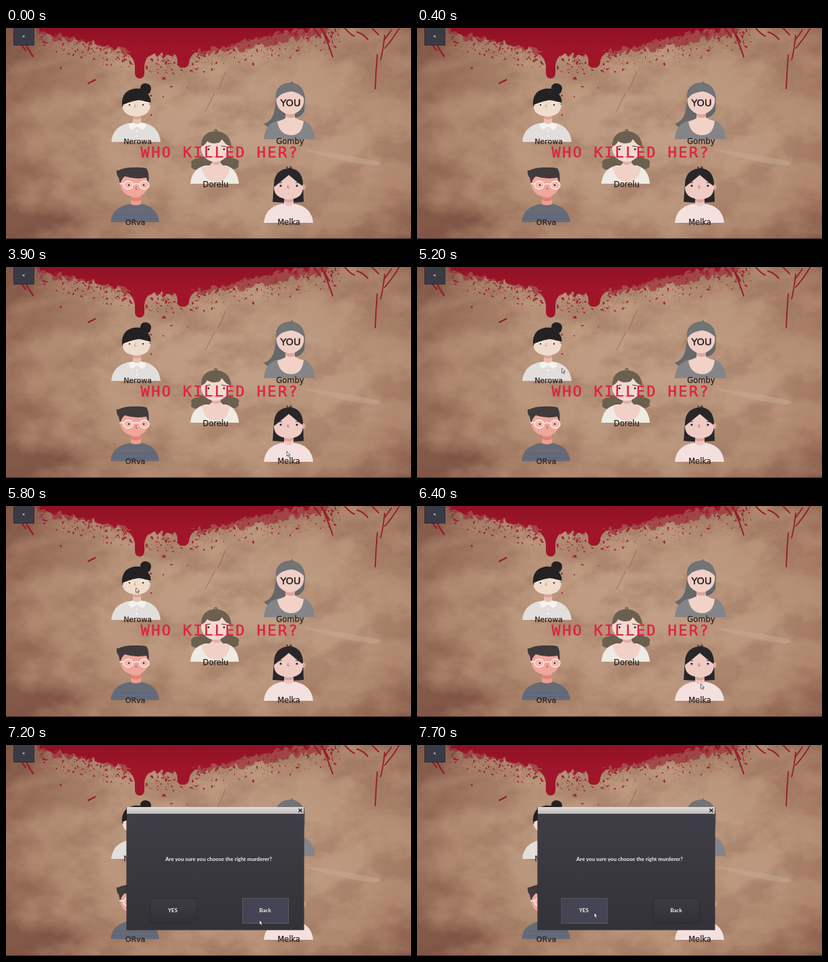
An HTML page for the animation above (8000 ms loop, 600 by 313 pixels).

```html
<!DOCTYPE html>
<html lang="en">
<head>
<meta charset="utf-8">
<title>Who killed her?</title>
<style>
  html, body { margin: 0; width: 100%; height: 100%; overflow: hidden; background: #b08c74; }
  .stage { position: absolute; left: 0; top: 0; width: 600px; height: 313px; overflow: hidden; }
  svg { position: absolute; left: 0; top: 0; display: block; }
  .name { font: 11.5px "DejaVu Sans", sans-serif; fill: #29211f; stroke: #29211f; stroke-width: .25; text-anchor: middle; }
  .title { font: 22px "DejaVu Sans Mono", monospace; letter-spacing: 2.4px; fill: #dc2440; stroke: #dc2440; stroke-width: .5; }
  .ui { font: bold 8px Lato, sans-serif; fill: #f4f3f3; text-anchor: middle; }

  #dialog, .hover, #cursor { animation: 8s infinite; }
  #dialog, .hover { opacity: 0; animation-timing-function: step-end; }
  #dialog { animation-name: open; }
  #yes { animation-name: yes; }
  #back { animation-name: back; }
  #cursor { animation-name: move; animation-timing-function: linear; }

  @keyframes open { 81.25% { opacity: 1; } }
  @keyframes yes { 96.25% { opacity: 1; } }
  @keyframes back { 88.75% { opacity: 1; } 92.5% { opacity: 0; } }
  @keyframes move {
    0% { transform: translate(302px, 320px); }
    37.5% { transform: translate(302px, 320px); animation-timing-function: steps(2); }
    40% { transform: translate(302px, 284px); }
    41.25% { transform: translate(302px, 284px); animation-timing-function: steps(6); }
    48.75% { transform: translate(415.5px, 273px); }
    51.25% { transform: translate(415.5px, 273px); animation-timing-function: steps(6); }
    58.75% { transform: translate(329px, 200px); }
    61.25% { transform: translate(329px, 200px); animation-timing-function: steps(3); }
    65% { transform: translate(214px, 149.5px); animation-timing-function: steps(6); }
    72.5% { transform: translate(192px, 121px); animation-timing-function: steps(6); }
    80% { transform: translate(420px, 263.5px); }
    87.5% { transform: translate(420px, 263.5px); animation-timing-function: steps(7); }
    96.25%, 100% { transform: translate(262px, 248.5px); }
  }
</style>
</head>
<body>
<div class="stage">

<svg width="600" height="313" viewBox="0 0 600 313">
  <defs>
    <radialGradient id="paper" gradientUnits="userSpaceOnUse" cx="0" cy="0" r="1" gradientTransform="translate(335 150) scale(390 235)">
      <stop offset="0" stop-color="#c2a087"/>
      <stop offset=".5" stop-color="#ba967c"/>
      <stop offset=".74" stop-color="#ae876e"/>
      <stop offset=".88" stop-color="#9d735e"/>
      <stop offset="1" stop-color="#83594a"/>
    </radialGradient>
    <filter id="warp" filterUnits="userSpaceOnUse" x="-60" y="-60" width="720" height="433" color-interpolation-filters="sRGB">
      <feTurbulence type="fractalNoise" baseFrequency=".02 .03" numOctaves="5" seed="4"/>
      <feDisplacementMap in="SourceGraphic" scale="90" xChannelSelector="R" yChannelSelector="G"/>
    </filter>
    <filter id="stain" filterUnits="userSpaceOnUse" x="0" y="0" width="600" height="313" color-interpolation-filters="sRGB">
      <feTurbulence type="fractalNoise" baseFrequency=".014 .02" numOctaves="6" seed="11"/>
      <feColorMatrix values="0 0 0 0 .47  0 0 0 0 .29  0 0 0 0 .22  2.6 0 0 0 -.8"/>
      <feComponentTransfer><feFuncA type="discrete" tableValues="0 0 .04 .08 .13 .18 .24"/></feComponentTransfer>
    </filter>
    <filter id="rough" filterUnits="userSpaceOnUse" x="-10" y="-20" width="620" height="160" color-interpolation-filters="sRGB">
      <feTurbulence type="fractalNoise" baseFrequency=".12" numOctaves="2" seed="3"/>
      <feDisplacementMap in="SourceGraphic" scale="6" xChannelSelector="R" yChannelSelector="G"/>
    </filter>
    <linearGradient id="gore" x2="0" y2="1">
      <stop offset="0" stop-color="#8c1022"/>
      <stop offset="1" stop-color="#a3172b"/>
    </linearGradient>
  </defs>

  <rect x="-60" y="-60" width="720" height="433" fill="url(#paper)" filter="url(#warp)"/>
  <rect width="600" height="313" filter="url(#stain)"/>
  <path d="M440 180q60 6 112 18q8 5 -8 6q-60 -8 -104 -24z" fill="#c8ab93" opacity=".5"/>
  <path d="M326 64l-12 28M309 97l-14 27" stroke="#945648" stroke-width="1.2" opacity=".55"/>

  <g filter="url(#rough)">
    <path id="haze" fill="#9c2632" opacity=".6"/>
    <path id="pool" fill="url(#gore)"/>
    <path id="spray" fill="#9a1f2f"/>
  </g>
  <path d="M178 36q12 8 13 20v12q1 7 7 7t7 -7v-12q0 -10 12 -20zM244 34q10 6 10 14v5q1 6 8 6t9 -6q0 -11 12 -19z" fill="#a0152a"/>
  <g fill="none" stroke="#941d2a" stroke-linecap="round">
    <path d="M454 -2q8 9 12 16M466 -2q10 20 18 45M472 8l7 13M500 -2q10 12 16 14M520 6q10 3 16 11" stroke-width="2"/>
    <path d="M550 40q-2 24 -3 50M561 11q-3 26 -6 36M584 -2q-12 20 -23 32M571 3l-10 14M540 -2l12 12" stroke-width="1.8"/>
    <path d="M28 22q5 10 12 20M22 24l7 9M122 82l10 -5" stroke-width="2.4"/>
  </g>
  <rect y="312" width="600" height="1" fill="#3a2720"/>

  <!-- top left -->
  <g>
    <path d="M188 125h12v14q2 6 -6 7q-9 -1 -6 -7z" fill="#e9bfb4"/>
    <path d="M188 130q6 4 12 0v4q-6 3 -12 0z" fill="#dca198"/>
    <path d="M172 112q10 -8 20 -8q14 0 22 6q1 21 -21 21q-21 0 -21 -19z" fill="#f0dccd"/>
    <path d="M172 117q-2 -21 14 -26q5 -2 13 -1q0 -8 8 -8q8 1 8 8q-1 7 -5 8q6 6 4 16q-8 -7 -18 -7q-16 2 -24 10z" fill="#242123"/>
    <path d="M156 169q2 -23 26 -28q12 3 24 0q21 6 23 28z" fill="#e1dedc"/>
    <path d="M182 142l6 -2q6 5 12 0l7 2q1 8 -6 9l-7 -5l-7 5q-6 -2 -5 -9z" fill="#f6f2ec"/>
    <g fill="#f8f5f0"><circle cx="194" cy="153" r="1.3"/><circle cx="194" cy="160" r="1.3"/></g>
    <path d="M173 115q8 -5 15 -1M199 112q7 -4 15 0" stroke="#faf2dd" fill="none" stroke-width="1.4"/>
    <g fill="#3d3330"><circle cx="183" cy="114" r="1.2"/><circle cx="203" cy="114" r="1.2"/></g>
    <path d="M192 113l-2 4h3" stroke="#c9a24b" fill="none"/>
    <circle cx="215" cy="129" r="1.3" fill="#b52334"/>
  </g>

  <!-- top right -->
  <g>
    <path d="M400 106q-2 -23 21 -25q20 1 22 24l-1 18q-5 10 -14 10l-16 4q-2 10 -13 12q-11 1 -17 -7q10 -3 14 -13q3 -8 4 -23z" fill="#66686b"/>
    <path d="M421 84q2 -4 6 -1M424 84q-2 -3 0 -5" stroke="#55575a" fill="none" stroke-width="1.2"/>
    <path d="M382 165q1 -23 22 -28l34 -1q18 5 20 29z" fill="#858588"/>
    <path d="M402 139q8 -3 12 -5v-10h14v9q6 4 13 5q-2 21 -19 21q-17 -1 -20 -20z" fill="#f2d2c6"/>
    <path d="M414 126h14v6q-8 3 -14 -1z" fill="#dba69d"/>
    <ellipse cx="421" cy="107" rx="20.5" ry="21" fill="#f1cfc6"/>
    <path d="M400 106q1 -22 21 -25q20 2 22 25q-7 -10 -20 -12q-15 1 -23 12z" fill="#727477"/>
    <text x="421.5" y="115.5" class="name" style="font-size:14.5px;stroke-width:.5px">YOU</text>
  </g>

  <!-- centre -->
  <g>
    <path d="M290 190q-4 4 -10 4q-8 3 -5 8q-3 5 4 8h24q6 -8 -1 -16zM332 190q4 4 8 4q8 3 4 8q3 4 -4 7h-20q-5 -8 0 -15z" fill="#6b604f"/>
    <path d="M309 154q-1 -4 3 -3l1 3" stroke="#50473b" fill="none" stroke-width="1.2"/>
    <path d="M273 231q2 -22 22 -27h31q17 5 19 27z" fill="#efeae3"/>
    <path d="M290 206q12 0 15 -6v-6h13v6q3 6 14 6q-3 22 -21 22q-18 -1 -21 -22z" fill="#f1d0c7"/>
    <path d="M305 197h13v4q-7 4 -13 0z" fill="#e0b0a6"/>
    <ellipse cx="310" cy="178" rx="21" ry="20.5" fill="#f3d9d0"/>
    <path d="M289 176q0 -22 21 -23q22 1 24 23q-8 -2 -11 -7l-3 -4l-4 5q-11 3 -18 -2q-3 6 -9 8z" fill="#6b604f"/>
    <path d="M296 176l7 -1M319 175l7 1" stroke="#4b3d35" stroke-width="1.2"/>
    <g fill="#332927"><circle cx="300" cy="180" r="1.4"/><circle cx="323" cy="180" r="1.4"/></g>
    <path d="M308 191q3 2 6 0" stroke="#c9685f" fill="none"/>
  </g>

  <!-- bottom left -->
  <g>
    <path d="M185 245h15v19q-8 5 -15 0z" fill="#ee9d91"/>
    <path d="M185 250q8 4 15 0v5q-8 4 -15 0z" fill="#df8276"/>
    <path d="M169 230q2 -8 6 -12h33q4 6 3 15q-3 17 -21 17q-19 -1 -21 -20z" fill="#f0a79b"/>
    <path d="M169 232q-1 -6 -2 -10q-4 -4 -3 -11q3 1 5 -1q8 -3 15 -3q15 -1 24 1q5 7 3 23l-3 -9q-17 3 -32 -2q-5 4 -7 12z" fill="#403a3c"/>
    <path d="M155 288q2 -23 29 -27q8 4 17 0q24 5 26 27z" fill="#666b76"/>
    <path d="M159 277h64M157 283h68" stroke="#56628a"/>
    <g fill="#f4b9ae" stroke="#f8f2ef" stroke-width="1.3"><ellipse cx="181" cy="233" rx="7" ry="6"/><ellipse cx="205" cy="233" rx="7" ry="6"/></g>
    <path d="M188 232q5 -2 10 0M168 231h6" stroke="#f8f2ef" fill="none" stroke-width="1.3"/>
    <g fill="#38292a"><circle cx="182" cy="233" r="1.3"/><circle cx="204" cy="233" r="1.3"/></g>
    <path d="M193 235l-1 4h3" stroke="#c45f59" fill="none"/>
  </g>

  <!-- bottom right -->
  <g>
    <path d="M397 231q1 -21 22 -23q20 1 21 23l1 27q-24 2 -46 0z" fill="#282629"/>
    <path d="M418 209q-1 -3 -3 -3M420 209l2 -4M421 209l3 -2" stroke="#282629" fill="none" stroke-width="1.2"/>
    <path d="M382 289q2 -23 26 -28h21q24 5 26 28z" fill="#f4e1df"/>
    <path d="M412 248h14v13q-7 7 -14 0z" fill="#edc5bf"/>
    <path d="M412 253q7 3 14 0v4q-7 3 -14 0z" fill="#dca39d"/>
    <ellipse cx="441" cy="236" rx="2.5" ry="4" fill="#e3a49e"/>
    <path d="M397 236q10 -8 22 -18q9 8 21 17q0 19 -21 19q-22 -1 -22 -18z" fill="#efcbc4"/>
    <path d="M403 230l6 -1M429 229l6 1" stroke="#4a3836"/>
    <g fill="#282225"><circle cx="407" cy="234" r="1.6"/><circle cx="431" cy="234" r="1.6"/></g>
    <path d="M418 233l-1 4h3" stroke="#b9655f" fill="none"/>
  </g>

  <g class="name">
    <text x="195" y="172" style="font-size:11px">Nerowa</text>
    <text x="421" y="171.5">Gomby</text>
    <text x="310.5" y="236">Dorelu</text>
    <text x="191.5" y="292" style="font-size:11px">ORva</text>
    <text x="419" y="291.5">Melka</text>
  </g>
  <text class="title" x="199.5" y="192">WHO KILLED HER?</text>

  <g>
    <rect x="11" width="31" height="26" fill="#3a3a45"/>
    <path d="M11.5 0v25.5h30V0" fill="none" stroke="#2d2c35"/>
    <text class="ui" x="26" y="15.3">&lt;</text>
  </g>
</svg>

<svg id="dialog" width="600" height="313" viewBox="0 0 600 313">
  <defs>
    <linearGradient id="panel" x2="0" y2="1">
      <stop offset="0" stop-color="#403f47"/>
      <stop offset="1" stop-color="#333239"/>
    </linearGradient>
    <linearGradient id="bar" x2="0" y2="1">
      <stop offset="0" stop-color="#dfdddb"/>
      <stop offset="1" stop-color="#bdbab8"/>
    </linearGradient>
    <linearGradient id="key" x2="0" y2="1">
      <stop offset="0" stop-color="#3d3c44"/>
      <stop offset="1" stop-color="#323138"/>
    </linearGradient>
  </defs>
  <rect x="178" y="92" width="264" height="183" rx="1" fill="#29262a" opacity=".55"/>
  <rect x="179" y="92" width="262" height="182" fill="url(#panel)"/>
  <rect x="179" y="92" width="262" height="10" fill="url(#bar)"/>
  <path d="M433.5 94.5l5 5m0 -5l-5 5" stroke="#1f1d20" stroke-width="1.5"/>
  <g fill="url(#key)" stroke="#2b2a30">
    <rect x="214" y="227.5" width="68" height="37"/>
    <rect x="350.5" y="227.5" width="68" height="37"/>
  </g>
  <g fill="#444454" stroke="#5b5a63">
    <rect id="yes" class="hover" x="214" y="227.5" width="68" height="37"/>
    <rect id="back" class="hover" x="350.5" y="227.5" width="68" height="37"/>
  </g>
  <g class="ui">
    <text x="315" y="172">Are you sure you choose the right murderer?</text>
    <text x="247" y="248.3">YES</text>
    <text x="384" y="248.3">Back</text>
  </g>
</svg>

<svg id="cursor" width="8" height="11" viewBox="0 0 8 11">
  <path d="M.5 .5v7l1.7 -1.5l1.2 2.7l1.2 -.6l-1.2 -2.5h2.2z" fill="#fff" stroke="#29252a" stroke-width=".7"/>
</svg>

</div>
<script>
  let seed = 19;
  const rand = () => (seed = seed * 16807 % 2147483647) / 2147483647;
  const bell = (x, mid, width) => Math.exp(-(((x - mid) / width) ** 2));
  const edge = x => 40 * bell(x, 235, 135);
  const rim = x => 46 * bell(x, 255, 185);
  const dot = (x, y, r) => `M${x - r} ${y}a${r} ${r} 0 1 0 ${2 * r} 0a${r} ${r} 0 1 0 ${-2 * r} 0z`;
  const draw = (id, d) => document.getElementById(id).setAttribute("d", d);

  function sheet(from, to, bottom, jitter) {
    let d = `M${from} -9`;
    for (let x = from; x <= to; x += 4) d += `L${x} ${bottom(x) + jitter * (rand() - .5)}`;
    return d + "V-9z";
  }
  draw("haze", sheet(45, 480, x => rim(x) - 4, 12));
  draw("pool", sheet(50, 450, edge, 8));

  let spray = "";
  for (let i = 0; i < 1300; i++) {
    const x = 45 + 450 * rand();
    spray += dot(x, edge(x) + (rim(x) - edge(x) + 22) * rand() ** 1.6, .3 + 1.5 * rand() ** 5);
  }
  for (const [x, y, r] of [[233, 75, 2], [215, 101, 1.6], [245, 88, 1], [270, 88, 1.1], [262, 100, .8], [233, 102, 1], [80, 60, 1.5]])
    spray += dot(x, y, r);
  draw("spray", spray);
</script>
</body>
</html>
```
